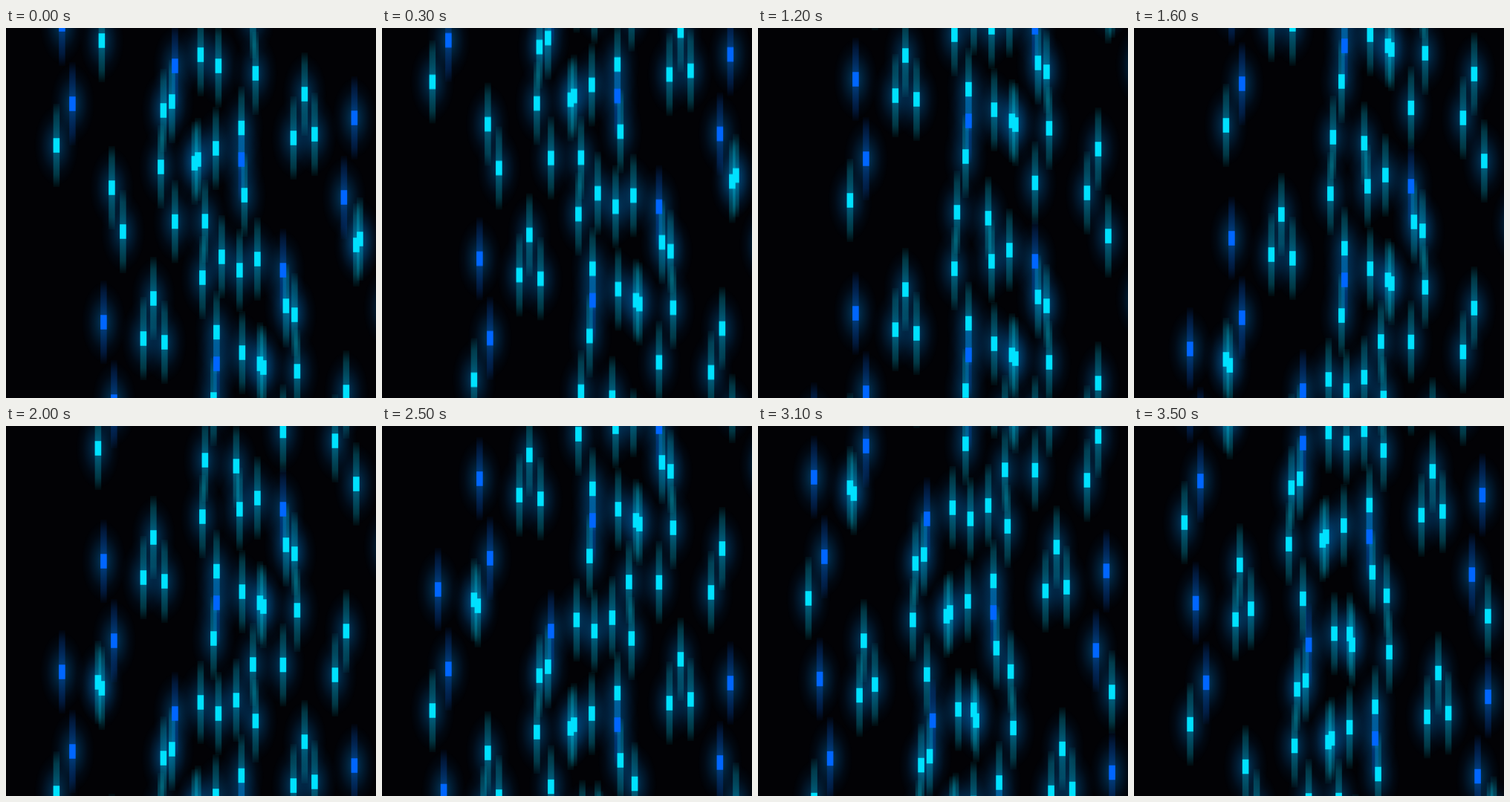
Animation, 498 px wide and 498 px high, one loop 3.6 s. Source, as an HTML page:

```html
<!DOCTYPE html>
<html lang="en">
<head>
<meta charset="utf-8">
<title>Rising lights</title>
<style>
  html, body { margin: 0; width: 100%; height: 100%; overflow: hidden; background: #020205; }
  svg { display: block; width: 100vw; height: 100vh; overflow: hidden; }
  .cyan { color: #00e1ff; }
  .blue { color: #0066ff; }
  #field { animation: rise 3600ms infinite; }
  @keyframes rise {
    0%      { transform: translateY(0);      animation-timing-function: steps(6); }
    16.666% { transform: translateY(-171px); animation-timing-function: steps(6); }
    33.333% { transform: translateY(-327px); animation-timing-function: steps(8); }
    55.555% { transform: translateY(-529px); animation-timing-function: steps(5); }
    69.444% { transform: translateY(-640px); animation-timing-function: steps(6); }
    86.111% { transform: translateY(-791px); animation-timing-function: steps(4); }
    97.222%, 100% { transform: translateY(-893px); }
  }
</style>
</head>
<body>
<svg viewBox="0 0 498 498" preserveAspectRatio="none">
  <defs>
    <radialGradient id="halo">
      <stop offset="0" stop-color="#0078c8" stop-opacity=".48"/>
      <stop offset=".35" stop-color="#0068b4" stop-opacity=".28"/>
      <stop offset=".7" stop-color="#0055a0" stop-opacity=".09"/>
      <stop offset="1" stop-color="#004890" stop-opacity="0"/>
    </radialGradient>
    <linearGradient id="cyanTail" class="cyan" x2="0" y2="1">
      <stop offset="0" stop-color="currentColor" stop-opacity=".04"/>
      <stop offset=".15" stop-color="currentColor" stop-opacity=".22"/>
      <stop offset=".5" stop-color="currentColor" stop-opacity=".29"/>
      <stop offset=".85" stop-color="currentColor" stop-opacity=".22"/>
      <stop offset="1" stop-color="currentColor" stop-opacity=".04"/>
    </linearGradient>
    <linearGradient id="blueTail" class="blue" x2="0" y2="1">
      <stop offset="0" stop-color="currentColor" stop-opacity=".03"/>
      <stop offset=".15" stop-color="currentColor" stop-opacity=".19"/>
      <stop offset=".5" stop-color="currentColor" stop-opacity=".28"/>
      <stop offset=".85" stop-color="currentColor" stop-opacity=".19"/>
      <stop offset="1" stop-color="currentColor" stop-opacity=".03"/>
    </linearGradient>
  </defs>
  <g id="field">
    <g id="halos" fill="url(#halo)"></g>
    <g id="tails"></g>
    <g id="cores" fill="currentColor"></g>
  </g>
</svg>
<script>
  // Key points of one row; every row is this one, shifted and perhaps mirrored
  const row = {
    blue: '75,-5 89,102 227,51',
    cyan: '67.5,158 128.5,17 223,99 253.5,182 261.5,36 285.5,51 316.5,134.5 ' +
          '332,-15 335.5,61 386.5,148 401.5,89'
  };
  const MIRROR = 543.5;  // x of a mirrored light is MIRROR - x
  const ROW_GAP = 126;   // from a row to its mirror image
  const PAIR_GAP = 275;  // from one pair of rows to a pair of the other kind
  const REPEAT = 315;    // height of the mirrored pair when it repeats
  const DRIFT = 7.7;     // sideways step between successive plain pairs
  const OFFSET = 56;     // sideways place of the mirrored pairs

  const add = (layer, tag, attrs) => {
    const el = document.createElementNS('http://www.w3.org/2000/svg', tag);
    for (const key in attrs) el.setAttribute(key, attrs[key]);
    document.getElementById(layer).append(el);
  };

  const bar = (layer, x, y, height, attrs) =>
    add(layer, 'rect', { x: x - 4.25, y: y - height / 2, width: 8.5, height, ...attrs });

  function light(x, y, tone) {
    add('halos', 'ellipse', { cx: x, cy: y, rx: 30, ry: 54 });
    bar('tails', x, y, 112, { fill: `url(#${tone}Tail)` });
    bar('cores', x, y, 19.5, { class: tone });
  }

  function placeRow(dx, dy, mirrored) {
    for (const tone in row)
      for (const point of row[tone].split(' ')) {
        const [x, y] = point.split(',').map(Number);
        light((mirrored ? MIRROR - x : x) + dx + 0.4, y + dy, tone);
      }
  }

  function placePair(dx, dy, mirrored) {
    placeRow(dx, dy, mirrored);
    placeRow(dx, dy + ROW_GAP, !mirrored);
  }

  // One scene: a plain pair, two mirrored pairs, then the scene begins again
  const scene = 2 * PAIR_GAP + REPEAT;
  placePair(0, 0, false);
  placePair(OFFSET, PAIR_GAP, true);
  placePair(OFFSET, PAIR_GAP + REPEAT, true);
  placePair(0, scene, false);
  placePair(DRIFT, scene + 271.5, false);
  placePair(OFFSET + DRIFT, scene + 271.5 + PAIR_GAP, true);
</script>
</body>
</html>
```
